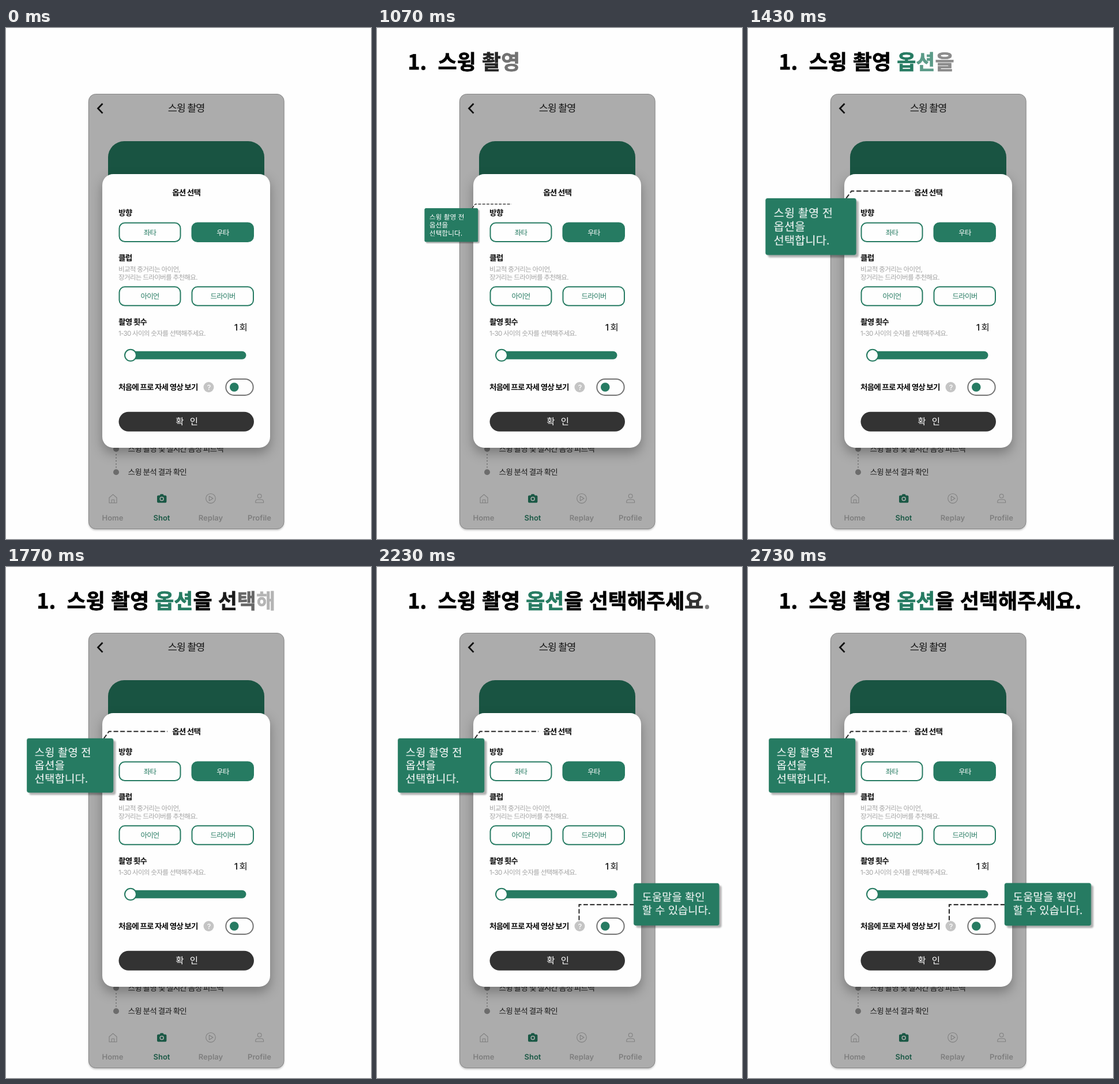
Write an HTML page that moves like this. It is 633x885 px and loops after 5.01 s.

```html
<!DOCTYPE html>
<html lang="ko">
<head>
<meta charset="utf-8">
<title>스윙 촬영</title>
<style>
  html, body { margin: 0; width: 100%; height: 100%; overflow: hidden; background: #fefefe; }
  svg { display: block; width: 633px; height: 885px; }
  text { font-family: "Noto Sans CJK KR", "Noto Sans CJK", sans-serif; white-space: pre; text-rendering: geometricPrecision; }
  .ui text { font-family: Inter, "Noto Sans CJK KR", "Noto Sans CJK", sans-serif; letter-spacing: -.063em; }
  .ui .nav text { font: 600 13px Inter, sans-serif; letter-spacing: 0; text-anchor: middle; }
  .mid { text-anchor: middle; }
  .bold { font-weight: 700; }
  .medium { font-weight: 500; }
  .hint { fill: #a3a3a3; font-size: 11.6px; }
  .green { fill: #267b62; }
  .outline { fill: #fefefe; stroke: #267b62; stroke-width: 2; }
  .label { font-size: 12.5px; font-weight: 500; text-anchor: middle; }
  .icon { fill: none; stroke: #808080; stroke-width: 1.1; stroke-linejoin: round; stroke-linecap: round; }
  .phone { filter: drop-shadow(0 2px 1.5px rgba(0,0,0,.22)); }
  .modal { filter: drop-shadow(0 9px 10px rgba(0,0,0,.3)); }
  #title { font-size: 36px; font-weight: 700; }
  #title tspan { fill: currentColor; stroke: currentColor; stroke-width: .7; }
  .pop rect { fill: #267b62; filter: drop-shadow(4px 4px 1.5px rgba(0,0,0,.3)); }
  .pop text { fill: #fefefe; font-size: 19px; font-weight: 500; }
  .pop path { fill: none; stroke: #151515; stroke-width: 1.9; stroke-dasharray: 8 3.6; }
</style>
</head>
<body>
<svg viewBox="0 0 633 885">
  <text id="title" y="72"></text>

  <g class="ui">
    <rect class="phone" x="143.5" y="114.5" width="338.5" height="753" rx="12" fill="#acacac" stroke="#858585"/>
    <path d="M167.5 131 L159.5 139.3 L167.5 147.6" fill="none" stroke="#111" stroke-width="2.8"/>
    <text class="mid medium" x="312.5" y="145.3" font-size="17.5" fill="#161616">스윙 촬영</text>
    <path d="M177 300 V224 a28 28 0 0 1 28 -28 H420 a28 28 0 0 1 28 28 V300 Z" fill="#195442"/>

    <path d="M191 738 V763" stroke="#6c6c6c" stroke-width="1.6" stroke-dasharray="2 3.4"/>
    <g fill="#6c6c6c"><circle cx="191" cy="729" r="5"/><circle cx="191" cy="769.3" r="5"/></g>
    <g class="medium" font-size="13.6" fill="#1c1c1c">
      <text x="211.5" y="734.3">스윙 촬영 및 실시간 음성 피드백</text>
      <text x="211.5" y="774.4">스윙 분석 결과 확인</text>
    </g>

    <g class="nav" fill="#7e7e7e">
      <path class="icon" d="M179 813.5 L185.5 807.8 L192 813.5 V822.5 H179 Z M183.3 822.5 V817 H187.7 V822.5"/>
      <path d="M264 809.5 h2.6 l1.4 -2.2 h4.4 l1.4 2.2 h2.6 a2 2 0 0 1 2 2 v8.8 a2 2 0 0 1 -2 2 h-12.4 a2 2 0 0 1 -2 -2 v-8.8 a2 2 0 0 1 2 -2 Z" fill="#1a5845"/>
      <circle cx="270.2" cy="815.6" r="3" fill="#1a5845" stroke="#acacac" stroke-width="1.5"/>
      <g class="icon">
        <circle cx="355" cy="814.8" r="8.3"/>
        <path d="M352.4 810.8 L359 814.8 L352.4 818.8 Z"/>
        <circle cx="439.7" cy="810.6" r="3.4"/>
        <path d="M432.8 822 v-1.8 a3.6 3.6 0 0 1 3.6 -3.4 h6.6 a3.6 3.6 0 0 1 3.6 3.4 v1.8 Z"/>
      </g>
      <text x="185" y="852.5">Home</text>
      <text x="270" y="852.5" fill="#1a5845">Shot</text>
      <text x="355" y="852.5">Replay</text>
      <text x="439.5" y="852.5">Profile</text>
    </g>

    <rect class="modal" x="167" y="253" width="291" height="474" rx="19" fill="#fefefe"/>
    <g class="bold" font-size="13.6" fill="#0c0c0c">
      <text class="mid" x="312.7" y="290.2">옵션 선택</text>
      <text x="195" y="324.7">방향</text>
      <text x="195" y="402.6">클럽</text>
      <text x="195" y="513.6">촬영 횟수</text>
      <text x="195" y="627.2">처음에 프로 자세 영상 보기</text>
    </g>
    <g class="hint">
      <text x="195" y="422.2">비교적 중거리는 아이언,</text>
      <text x="195" y="435.7">장거리는 드라이버를 추천해요.</text>
      <text x="195" y="532.7">1-30 사이의 숫자를 선택해주세요.</text>
    </g>

    <g class="outline">
      <rect x="196.5" y="337.5" width="106" height="32.5" rx="9.5"/>
      <rect class="green" x="322.5" y="337.5" width="106.5" height="32.5" rx="9.5"/>
      <rect x="196.5" y="448.3" width="106" height="32.5" rx="9.5"/>
      <rect x="322.5" y="448.3" width="106.5" height="32.5" rx="9.5"/>
    </g>
    <g class="label green">
      <text x="249.5" y="358.5">좌타</text>
      <text x="376" y="358.5" fill="#fefefe">우타</text>
      <text x="249.5" y="469.3">아이언</text>
      <text x="376" y="469.3">드라이버</text>
    </g>

    <text class="medium" x="395.8" y="523.7" font-size="15.5" fill="#111">1 회</text>
    <rect class="green" x="207" y="559.8" width="209.5" height="14" rx="7"/>
    <circle class="outline" cx="216" cy="566.8" r="10"/>

    <circle cx="351.5" cy="622" r="9" fill="#c4c4c4"/>
    <text class="mid medium" x="351.7" y="626.6" font-size="12.5" fill="#fefefe">?</text>
    <rect x="381.3" y="608" width="47.4" height="28" rx="14" fill="#fefefe" stroke="#747474" stroke-width="2"/>
    <circle class="green" cx="395.8" cy="622" r="7.8"/>

    <rect x="195.5" y="664.7" width="234.5" height="34" rx="17" fill="#333"/>
    <g class="mid medium" font-size="15.5" fill="#fefefe">
      <text x="300.8" y="687.3">확</text>
      <text x="325.3" y="687.3">인</text>
    </g>
  </g>

  <g class="pop" id="optionTip">
    <path d="M169.5 297 L178.5 284.8 H280"/>
    <rect x="36" y="296.7" width="150.3" height="94" rx="3.5"/>
    <text x="49.5" y="328">스윙 촬영 전</text>
    <text x="49.5" y="350.6">옵션을</text>
    <text x="49.5" y="373.2">선택합니다.</text>
  </g>
  <g class="pop" id="helpTip">
    <path d="M349 612 V584.8 H445"/>
    <rect x="444.8" y="547.3" width="150.2" height="74" rx="3.5"/>
    <text x="459.5" y="578.5">도움말을 확인</text>
    <text x="459.5" y="601">할 수 있습니다.</text>
  </g>
</svg>
<script>
  const LOOP = 5010, PAPER = '#fefefe';
  const at = ms => ms / LOOP;
  const play = (el, frames) => el.animate(frames, { duration: LOOP, iterations: Infinity });

  // Title: letters fade in one after another.
  const FIRST = 108, GAP = 98, FADE = 325;
  const title = document.getElementById('title');
  [...'1.  스윙 촬영 옵션을 선택해주세요.'].forEach((char, i) => {
    const span = document.createElementNS('http://www.w3.org/2000/svg', 'tspan');
    span.textContent = char;
    if (i === 0) span.setAttribute('x', 53.2);
    if (i === 4) span.setAttribute('x', 105.5);
    title.append(span);
    const color = '옵션'.includes(char) ? '#267b62' : '#000000';
    const start = FIRST + i * GAP;
    play(span, [
      { color: PAPER, offset: 0 },
      { color: PAPER, offset: at(start) },
      { color, offset: at(start + FADE) },
      { color, offset: 1 }
    ]);
  });

  // Callouts: bounce in around the centre of box and leader line.
  const BOUNCE = [0, 1.21, .9, 1.05, .97, 1], STEP = 150;
  const pop = (id, start, origin) => {
    const el = document.getElementById(id);
    el.style.transformOrigin = origin;
    const frame = (scale, offset) =>
      ({ transform: `scale(${scale})`, offset, easing: 'cubic-bezier(.37,0,.63,1)' });
    play(el, [
      frame(0, 0),
      ...BOUNCE.map((scale, i) => frame(scale, at(start + i * STEP))),
      frame(1, 1)
    ]);
  };
  pop('optionTip', 995, '157.5px 337.5px');
  pop('helpTip', 1985, '471.5px 584px');
</script>
</body>
</html>
```
